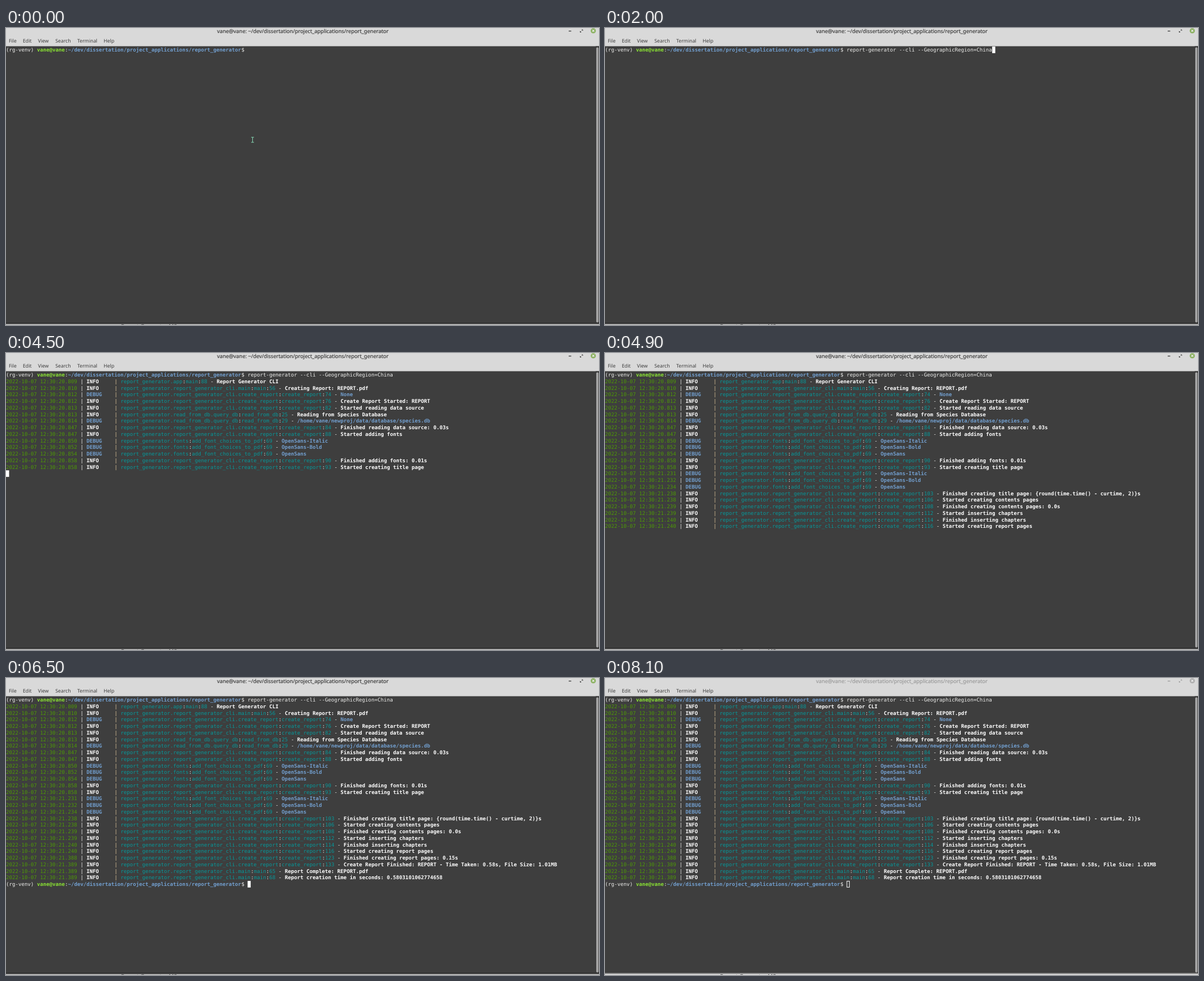
An HTML page for the animation above (8300 ms loop, 1057x530 px).

```html
<!DOCTYPE html>
<html lang="en">
<head>
<meta charset="utf-8">
<title>Report generator terminal</title>
<style>
  html, body { margin: 0; width: 100%; height: 100%; overflow: hidden; background: #3e3e3e; }
  svg { display: block; }
  text { text-rendering: geometricPrecision; white-space: pre; }
  .mono { font: 9.17px "DejaVu Sans Mono", monospace; }
  .ui { font: 8.75px "Noto Sans", "Open Sans", sans-serif; fill: #3c3c3c; }
  .title { font-size: 9.36px; stroke-width: .22px; text-anchor: middle; }
</style>
</head>
<body>
<svg id="stage" width="1057" height="530" viewBox="0 0 1057 530"></svg>
<script>
const NS = "http://www.w3.org/2000/svg";
const LOOP = 8300, COL = 5.521, ROW = 11.75, TOP = 33.1;
const FG = "#eeeeec", WHITE = "#ffffff", GREEN = "#4e9a06", CYAN = "#06989a",
      LIME = "#8ae234", BLUE = "#729fcf", TAN = "#e2c79c";
const USER = "vane";
const PATH = "~/dev/dissertation/project_applications/report_generator";
const COMMAND = "report-generator --cli --GeographicRegion=China";
const PROMPT_COLS = 78;
const stage = document.getElementById("stage");

function add(parent, tag, attrs = {}, content = "") {
  const node = document.createElementNS(NS, tag);
  for (const key in attrs) node.setAttribute(key, attrs[key]);
  node.textContent = content;
  parent.appendChild(node);
  return node;
}
const rect = (parent, x, y, width, height, fill, more) =>
  add(parent, "rect", { x, y, width, height, fill, ...more });
const path = (parent, d, stroke, width = 1, more) =>
  add(parent, "path", { d, stroke, "stroke-width": width, fill: "none", ...more });
const show = (node, on) => node.setAttribute("display", on ? "inline" : "none");

// Writes [text, colour, bold] segments on the character grid.
function writeRow(row, segments, col = 0) {
  const group = add(stage, "g", { class: "mono" });
  for (const [text, fill, bold] of segments) {
    const lead = text.length - text.trimStart().length;
    if (text.trim()) add(group, "text", {
      x: ((col + lead) * COL).toFixed(2), y: (TOP + row * ROW + 8.9).toFixed(2),
      fill, "font-weight": bold ? 700 : 400
    }, text.trim());
    col += text.length;
  }
  return group;
}
const writePrompt = row => writeRow(row, [
  ["(rg-venv) ", FG], [`${USER}@${USER}`, LIME, true], [":", FG], [PATH, BLUE, true], ["$", FG]
]);

// Window
rect(stage, 0, 0, 1057, 530, "#3e3e3e");
rect(stage, 0, 0, 1057, 32.5, "#d9d9d9");
const title = add(stage, "text", { class: "ui title", x: 529, y: 9.2 }, `${USER}@${USER}: ${PATH}`);
[["File", 5], ["Edit", 30], ["View", 57], ["Search", 88], ["Terminal", 127], ["Help", 174]]
  .forEach(([label, x]) => add(stage, "text", { class: "ui", x, y: 26.2 }, label));

const controls = add(stage, "g");
path(controls, "M1003 5.5h4.5", "currentColor", 1.4);
path(controls, "M1026.2 3h1.8v1.8M1025.2 7.5h-1.8v-1.8M1027.6 3.4l-1.2 1.2M1023.8 7.1l1.2-1.2", "currentColor", 1);
const closeDisc = add(stage, "circle", { cx: 1046.8, cy: 5, r: 4.6 });
path(stage, "M1045 3.2l3.6 3.6M1048.6 3.2l-3.6 3.6", "#f4f4f4", 1.1);

rect(stage, 1051, 32.5, 6, 494, "#393939");
rect(stage, 1052, 34.5, 4.2, 491, "#a3a3a3", { rx: 2 });
const shadow = rect(stage, 0, 526.3, 1057, 1.9);
const below = rect(stage, 0, 528, 1057, 2);
add(stage, "text", { class: "ui", x: 205, y: 536, style: "font-size:10px" }, "Report Generator MS");

// Terminal contents
const APP = "report_generator.";
const CREATE = "report_generator_cli.create_report:create_report:";
const MAIN = "report_generator_cli.main:main:";
const READ = "read_from_db.query_db:read_from_db:";
const FONTS = "fonts:add_font_choices_to_pdf:69";
const fontLines = times => ["OpenSans-Italic", "OpenSans-Bold", "OpenSans"]
  .map((name, i) => [times[i], "DEBUG", FONTS, name]);

const LOG = [
  ["20.809", "INFO", "app:main:88", "Report Generator CLI"],
  ["20.810", "INFO", MAIN + 56, "Creating Report: REPORT.pdf"],
  ["20.812", "DEBUG", CREATE + 74, "None"],
  ["20.812", "INFO", CREATE + 76, "Create Report Started: REPORT"],
  ["20.813", "INFO", CREATE + 82, "Started reading data source"],
  ["20.813", "INFO", READ + 25, "Reading from Species Database"],
  ["20.814", "DEBUG", READ + 29, `/home/${USER}/newproj/data/database/species.db`],
  ["20.847", "INFO", CREATE + 84, "Finished reading data source: 0.03s"],
  ["20.847", "INFO", CREATE + 88, "Started adding fonts"],
  ...fontLines(["20.850", "20.852", "20.854"]),
  ["20.858", "INFO", CREATE + 90, "Finished adding fonts: 0.01s"],
  ["20.858", "INFO", CREATE + 93, "Started creating title page"],
  ...fontLines(["21.231", "21.232", "21.234"]),
  ["21.238", "INFO", CREATE + 103, "Finished creating title page: {round(time.time() - curtime, 2)}s"],
  ["21.238", "INFO", CREATE + 106, "Started creating contents pages"],
  ["21.239", "INFO", CREATE + 108, "Finished creating contents pages: 0.0s"],
  ["21.239", "INFO", CREATE + 112, "Started inserting chapters"],
  ["21.240", "INFO", CREATE + 114, "Finished inserting chapters"],
  ["21.240", "INFO", CREATE + 116, "Started creating report pages"],
  ["21.388", "INFO", CREATE + 123, "Finished creating report pages: 0.15s"],
  ["21.389", "INFO", CREATE + 133, "Create Report Finished: REPORT - Time Taken: 0.58s, File Size: 1.01MB"],
  ["21.389", "INFO", MAIN + 65, "Report Complete: REPORT.pdf"],
  ["21.389", "INFO", MAIN + 68, "Report creation time in seconds: 0.5803101062774658"]
];

writePrompt(0);
const recalled = writeRow(0, [["clear", FG]], PROMPT_COLS);
const command = writeRow(0, [[COMMAND, FG]], PROMPT_COLS);
const logRows = LOG.map(([time, level, origin, message], i) => {
  const tone = level === "INFO" ? WHITE : BLUE;
  const [module, func, line] = origin.split(":");
  return writeRow(i + 1, [
    ["2022-10-07 12:30:" + time, GREEN], [" | ", FG], [level.padEnd(8), tone, true], [" | ", TAN],
    [APP + module, CYAN], [":", FG], [func, CYAN], [":", FG], [line, CYAN], [" - ", FG],
    [message, tone, true]
  ]);
});
const lastPrompt = writePrompt(LOG.length + 1);
const caret = rect(stage, 0, 0, COL, ROW, WHITE);

// Pointers
const beam = path(stage, "M-2.5 -4.5H2.5M0 -4.5V4.5M-2.5 4.5H2.5", "#86d8b4", 1);
const arrow = path(stage, "M.5 .5V11L3 8.8 4.7 12.6 6.5 11.8 4.9 8.1H8Z", "#333333", .8, { fill: "#ffffff" });

// Caret timeline: [start, column, row]; a null column hides it.
const END = PROMPT_COLS + COMMAND.length, LAST = LOG.length + 1;
const CARET = [
  [0, null], [200, PROMPT_COLS + 5, 0],
  [800, END, 0], [1400, null], [2000, END, 0], [2600, null], [3200, END, 0], [3800, null],
  [4100, 0, 1], [4500, 0, 15], [4700, null],
  [5300, PROMPT_COLS, LAST], [5900, null], [6500, PROMPT_COLS, LAST],
  [7100, null], [7700, PROMPT_COLS, LAST]
];

function drawCaret(t, focused) {
  const [, col, row] = CARET.filter(([start]) => start <= t).pop();
  show(caret, col !== null);
  if (col === null) return;
  const inset = focused ? 0 : .5;
  const box = { x: col * COL + inset, y: TOP + row * ROW + inset,
    width: COL - 2 * inset, height: ROW - 2 * inset,
    fill: focused ? WHITE : "none", stroke: focused ? "none" : WHITE };
  for (const key in box) caret.setAttribute(key, box[key]);
}

function drawPointer(t) {
  const leaving = t >= 7000 && t < 7300;
  const step = Math.floor((t - 7000) / 100);
  const x = leaving ? 420 - 62 * step : 439.5;
  const y = leaving ? 184 - 50 * step : 199.5;
  show(beam, t < 200 || leaving);
  beam.setAttribute("transform", `translate(${x} ${y})`);
  show(arrow, t >= 7300 && t < 7400);
  arrow.setAttribute("transform", "translate(205 14)");
}

function render(t) {
  const focused = t < 8100;
  const lines = t < 4500 ? 0 : t < 4900 ? 14 : t < 5100 ? 23 : LOG.length;
  show(recalled, t >= 200 && t < 800);
  show(command, t >= 800);
  logRows.forEach((row, i) => show(row, i < lines));
  show(lastPrompt, t >= 5100);
  drawCaret(t, focused);
  drawPointer(t);

  const ink = focused ? "#404040" : "#9c9c9c";
  title.style.fill = title.style.stroke = controls.style.color = ink;
  closeDisc.setAttribute("fill", focused ? "#8ab05f" : "#adadad");
  shadow.setAttribute("fill", focused ? "#2c2c2c" : "#858585");
  below.setAttribute("fill", focused ? "#aeaeae" : "#d4d4d4");
}

const start = performance.now();
function tick() {
  render((performance.now() - start) % LOOP);
  requestAnimationFrame(tick);
}
tick();
</script>
</body>
</html>
```
